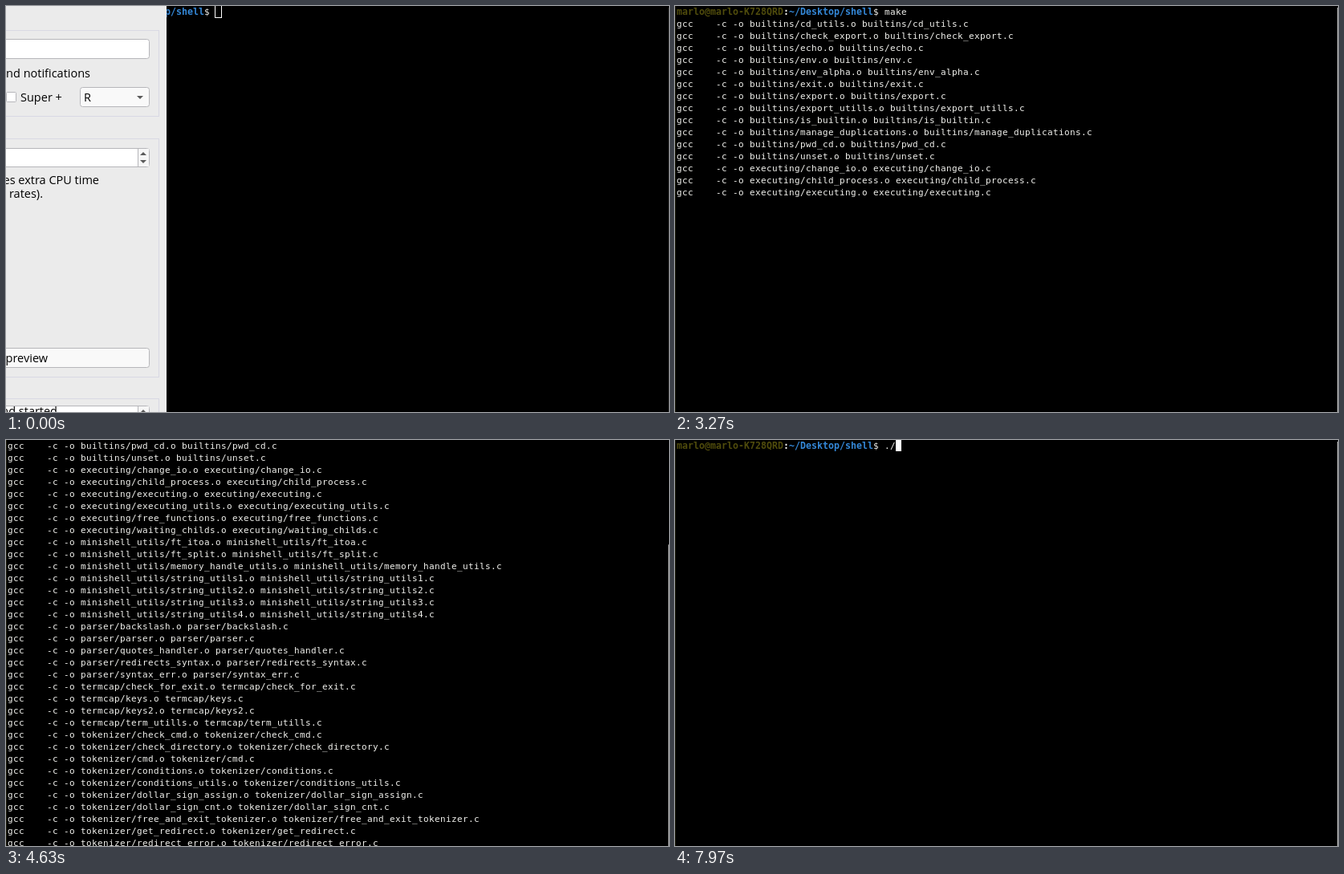
An HTML page with a canvas that plays this animation: 826x506 px, repeating every 8 s.

```html
<!DOCTYPE html>
<html lang="en">
<head>
<meta charset="utf-8">
<title>Building a shell</title>
<style>
  html, body { margin: 0; width: 100%; height: 100%; overflow: hidden; background: #000; }
  canvas { display: block; }
</style>
</head>
<body>
<canvas id="stage" width="826" height="506"></canvas>
<script>
const W = 826, H = 506, LOOP = 8000;
const CELL = 7, ROW = 15, LEFT = 2, BASE = 11, COLS = 117, ROWS = 37;
const MONO = '11px "DejaVu Sans Mono", monospace';
const BOLD = 'bold 11.6px "DejaVu Sans Mono", monospace';
const UI = '14.5px "Open Sans", sans-serif';
const TEXT = '#f2f2ee', CURSOR = '#fff', EDGE = '#b6b6ba';
const ctx = document.getElementById('stage').getContext('2d');

const folders = {
  builtins: 'cd_utils check_export echo env env_alpha exit export export_utills is_builtin manage_duplications pwd_cd unset',
  executing: 'change_io child_process executing executing_utils free_functions waiting_childs',
  minishell_utils: 'ft_itoa ft_split memory_handle_utils string_utils1 string_utils2 string_utils3 string_utils4',
  parser: 'backslash parser quotes_handler redirects_syntax syntax_err',
  termcap: 'check_for_exit keys keys2 term_utills',
  tokenizer: 'check_cmd check_directory cmd conditions conditions_utils dollar_sign_assign dollar_sign_cnt ' +
    'free_and_exit_tokenizer get_redirect redirect_error redirects'
};
const files = Object.entries(folders)
  .flatMap(([dir, names]) => names.split(' ').map(name => dir + '/' + name))
  .concat('main');
const compile = files.map(f => `gcc    -c -o ${f}.o ${f}.c`);
const link = `gcc ${files.map(f => f + '.o').join(' ')} -o minishell`
  .match(new RegExp(`.{1,${COLS}}`, 'g'));
const output = [...compile, ...link];

// prompt parts: text, colour, font
const prompt = [
  ['marlo@marlo-K728QRD', '#504c0c', BOLD],
  [':', TEXT, BOLD],
  ['~/Desktop/shell', '#3488d8', BOLD],
  ['$', TEXT, MONO]
];
const PROMPT_COLS = 37;

const FOCUS = 490, ENTER = 2450, LINKED = 4680, CLEAR = 7070, BLINK = 640;
const keys = [[2000, 'm'], [2120, 'a'], [2230, 'k'], [2340, 'e'], [7700, '.'], [7900, '/']];
const presses = [FOCUS, ...keys.map(k => k[0]), ENTER, CLEAR].sort((a, b) => a - b);
const progress = [[2480, 0], [2790, 6], [3260, 15], [3625, 25], [4260, 38], [4620, 46]];

function printed(t) {
  if (t >= LINKED) return output.length;
  let n = 0;
  progress.forEach(([t1, n1], i) => {
    if (t < t1) return;
    const [t2, n2] = progress[i + 1] || [t1 + 1, n1];
    n = n1 + (n2 - n1) * Math.min(1, (t - t1) / (t2 - t1));
  });
  return Math.floor(n + 1e-6);
}

// one glyph per terminal cell
function put(text, col, row, color = TEXT, font = MONO) {
  ctx.font = font;
  ctx.fillStyle = color;
  for (const char of text) {
    if (char !== ' ') ctx.fillText(char, LEFT + col * CELL, BASE + row * ROW);
    col++;
  }
}

function drawPrompt(row, typed) {
  let col = 0;
  for (const [text, color, font] of prompt) {
    put(text, col, row, color, font);
    col += text.length;
  }
  put(typed, PROMPT_COLS, row);
}

function drawCursor(t, col, row) {
  const x = LEFT + col * CELL, y = row * ROW - 1;
  if (t < FOCUS) {
    ctx.strokeStyle = CURSOR;
    ctx.lineWidth = 1;
    ctx.strokeRect(x - .5, y - .5, CELL + 1, ROW + 1);
    return;
  }
  const last = presses.filter(p => p <= t).pop();
  if ((t - last) % (2 * BLINK) >= BLINK) return;
  ctx.fillStyle = CURSOR;
  ctx.fillRect(x, y, CELL, ROW);
}

function drawTerminal(t) {
  const cleared = t >= CLEAR;
  const typed = keys.filter(([at]) => at <= t && (at > CLEAR) === cleared).map(k => k[1]).join('');
  const count = cleared ? 0 : printed(t);
  const running = !cleared && t >= ENTER;
  const line = running ? count + 1 : 0;
  const top = Math.max(0, line - ROWS + 1);

  ctx.fillStyle = '#000';
  ctx.fillRect(0, 0, W, H);
  ctx.fillStyle = '#202010';
  ctx.fillRect(0, 0, 1, H);

  if (!top) drawPrompt(0, typed);
  for (let i = Math.max(1, top); i <= count && i < top + 34; i++) put(output[i - 1], 0, i - top);
  drawCursor(t, running ? 0 : PROMPT_COLS + typed.length, line - top);

  const thumb = Math.max(2, 545 * top / (top + 35));
  ctx.fillStyle = t < FOCUS ? '#222' : '#a5a5a5';
  ctx.fillRect(W - 1, thumb, 1, H - thumb);
}

function box(x, y, right, bottom, fill, radius = 3) {
  ctx.beginPath();
  ctx.roundRect(x + .5, y + .5, right - x - 1, bottom - y - 1, radius);
  ctx.fillStyle = fill;
  ctx.fill();
  ctx.strokeStyle = EDGE;
  ctx.stroke();
}

function group(y, bottom) {
  ctx.strokeStyle = '#d9d9e4';
  ctx.strokeRect(-700.5, y + .5, 891, bottom - y);
}

function arrow(x, y, dir) {
  ctx.fillStyle = '#5a5a5a';
  ctx.beginPath();
  ctx.moveTo(x - 4, y - 2 * dir);
  ctx.lineTo(x + 4, y - 2 * dir);
  ctx.lineTo(x, y + 2 * dir);
  ctx.fill();
}

function spin(y) {
  box(-400, y, 179, y + 24, '#fff');
  ctx.fillStyle = '#f6f6f6';
  ctx.fillRect(165, y + 1, 13, 22);
  ctx.fillStyle = EDGE;
  ctx.fillRect(164, y, 1, 24);
  arrow(171, y + 7, -1);
  arrow(171, y + 17, 1);
}

function label(text, x, y, align = 'right') {
  ctx.font = UI;
  ctx.textAlign = align;
  ctx.fillStyle = '#000';
  ctx.fillText(text, x, y);
}

function drawSettings(t) {
  const p = Math.min(1, Math.max(0, (t - 30) / 400));
  if (p === 1) return;
  const eased = p * p * (3 - 2 * p), s = 1 - .95 * eased;
  ctx.save();
  ctx.translate(-690, 300);
  ctx.scale(s, s);
  ctx.translate(690, -300);
  ctx.lineWidth = 1;
  ctx.fillStyle = '#ebebeb';
  ctx.fillRect(-650, -200, 850, 850);

  group(30, 137);
  box(-400, 41, 179, 66, '#fff');
  label('and notifications', 105, 89);
  box(0, 107, 13, 120, '#fff', 1);
  label('Super +', 18, 119, 'left');
  box(92, 101, 179, 126, '#f9f9f9');
  label('R', 97, 119, 'left');
  arrow(167, 114, 1);

  group(165, 462);
  spin(177);
  label('uses extra CPU time', 116, 222);
  label('frame rates).', 46, 239);
  box(-400, 426, 179, 451, '#f9f9f9');
  label('Start preview', 52, 444);

  group(489, 620);
  spin(498);
  label('and started', 64, 510);
  ctx.restore();
}

function draw(t) {
  drawTerminal(t);
  drawSettings(t);
}

const start = performance.now();
function tick() {
  draw((performance.now() - start) % LOOP);
  requestAnimationFrame(tick);
}
tick();
</script>
</body>
</html>
```
